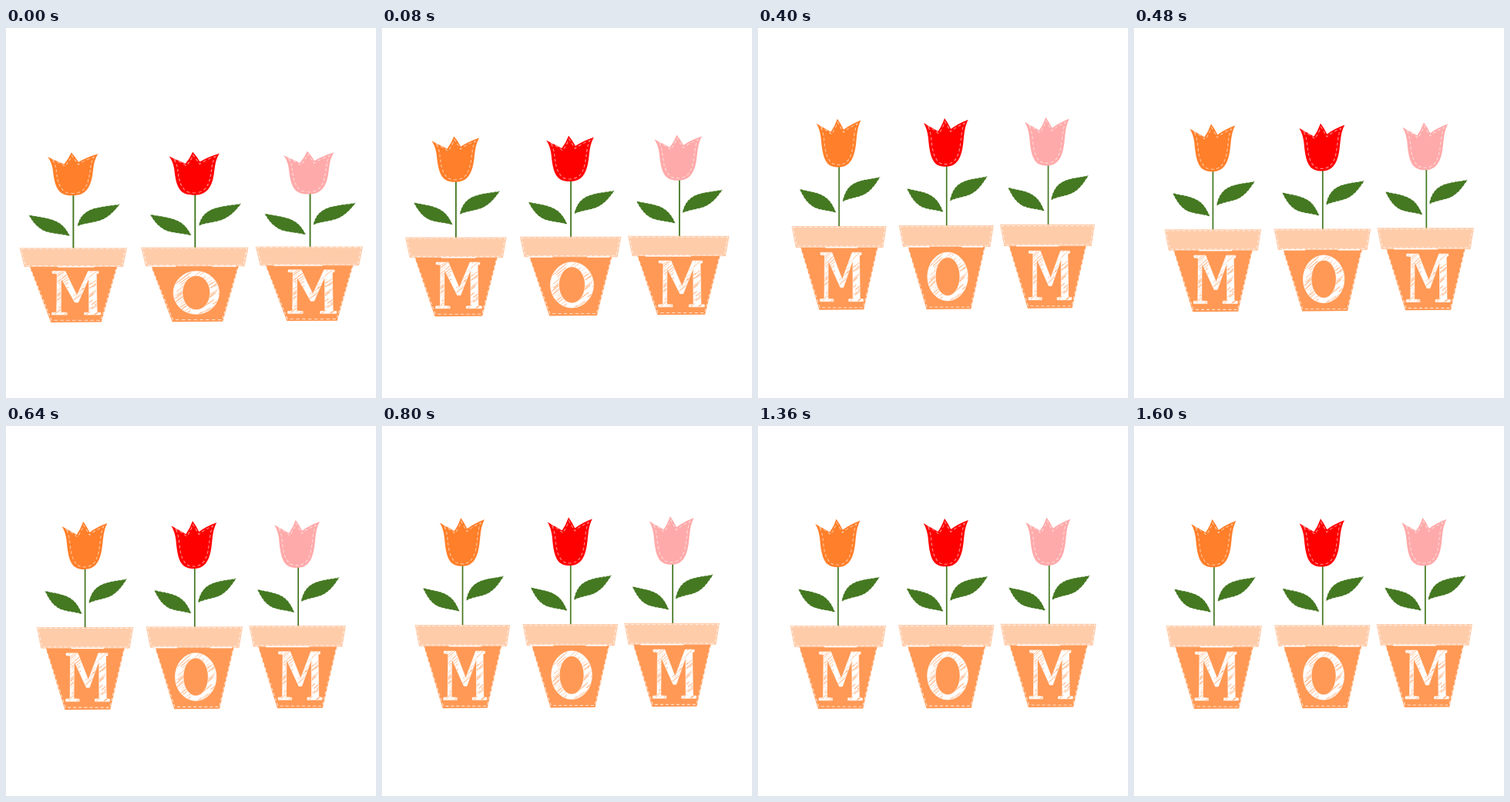
An HTML page with a canvas that plays this animation: 480x480 px, repeating every 1920 ms.

```html
<!DOCTYPE html>
<html lang="en">
<head>
<meta charset="utf-8">
<title>Mom flower pots</title>
<style>
  html, body { margin: 0; width: 100%; height: 100%; overflow: hidden; background: #fff; }
  canvas { display: block; }
</style>
</head>
<body>
<canvas id="stage" width="480" height="480"></canvas>
<script>
const ctx = document.getElementById('stage').getContext('2d');
const LOOP = 1920, STEP = 80;
// Steps at which the pose changes; in between it is held.
const POSES = [0, 1, 2, 3, 4, 5, 6, 7, 8, 9, 10, 12, 13, 14, 15, 17, 20];
const RIM = '#ffccaa', POT = '#ff9955', GREEN = '#447821';

const rim = new Path2D('M41.6 259H166L161.5 286.8H47Z');
const rimSeam = new Path2D('M43.4 260.6H164L160 285H48.4Z');
const pot = new Path2D('M53 285.5H154.8L136.2 366.5L78 367Z');
const potSeam = new Path2D('M53.5 287L78.6 364H135.8L154 287');
const tulip = new Path2D('M74.2 127.2Q83 132 93 138Q98 131 101.5 121Q106 127 109.8 135' +
  'Q119 128 132.4 123C127.5 133 127.5 141 126.5 148C125 166 121 181 107 183' +
  'C99 184 92 182.5 88 177.5C82 170 81 155 80 145C79 138 77.5 133 74.2 127.2Z');
const tulipSeam = new Path2D('M79 130.5Q88 136 94 141Q99 134 102 125.5Q106 132 109.5 138.5' +
  'Q117 132 127.5 127.5C123.5 137 124 143 123 149C121 166 118 178 106 180' +
  'C98 181 93 178.5 91 174C85.5 167 85 154 84 146C83 139 82 135 79 130.5Z');
const leaves = new Path2D('M52 211.3C60 213.5 70 214.5 79 218C89 222 95 229 100 242' +
  'C91 239 80 239 71 235C62 230 57 222 52 211.3Z' +
  'M108.3 227.8C111 214 117 206 128 202C138 198.5 148 198 157.8 195.8' +
  'C152 205 146 214 136 219C127 223 118 223 108.3 227.8Z');

const letters = {
  M: new Path2D('M79.5 293H94.5L108 328L121 293H133V296L130.5 296.5L131.3 352.5L135.5 353V356H116.5' +
    'V353L122 352.5L121.8 303L109.5 338H105.5L89.7 303L89.4 352.5L96.5 353V356H79V353L84.5 352.5L85 296.5L79.5 296Z'),
  O: new Path2D()
};
letters.O.ellipse(105.6, 324.8, 26.5, 31.2, 0, 0, 7);
letters.O.closePath();
letters.O.moveTo(121.6, 324.8);
letters.O.ellipse(105.6, 324.8, 16, 24.8, 0, 0, 7);
letters.O.closePath();

const plants = [
  { x: 0, y: 0, stem: 103, color: '#ff7f2a', letter: 'M', gaps: [[86, 128]] },
  { x: 140.5, y: -0.8, stem: 103.4, color: '#ff0000', letter: 'O', gaps: [[52, 82], [124, 152]] },
  { x: 273, y: -2, stem: 104, color: '#ffaaaa', letter: 'M', gaps: [[63, 119]] }
];

function random(seed) {
  return () => (seed = (seed * 16807) % 2147483647) / 2147483647;
}

function fill(path, color) {
  ctx.fillStyle = color;
  ctx.fill(path, 'evenodd');
}

function stitch(path, dash, width, alpha) {
  ctx.setLineDash(dash);
  ctx.lineWidth = width;
  ctx.strokeStyle = `rgba(255,255,255,${alpha})`;
  ctx.stroke(path);
  ctx.setLineDash([]);
}

function drawLetter(path) {
  const rnd = random(77);
  fill(path, '#fff');
  ctx.save();
  ctx.clip(path, 'evenodd');
  ctx.strokeStyle = POT;
  ctx.globalAlpha = 0.75;
  for (let y = 300; y < 420; y += 2.9) {
    const start = 76 + rnd() * 12, slope = 0.75 + rnd() * 0.2;
    for (let x = start; x < 136; x += 18 + rnd() * 8) {
      const end = x + 9 + rnd() * 9;
      ctx.lineWidth = 0.4 + rnd() * 0.8;
      ctx.beginPath();
      ctx.moveTo(x, y - (x - 76) * slope);
      ctx.lineTo(end, y - (end - 76) * slope);
      ctx.stroke();
    }
  }
  ctx.restore();
  ctx.lineWidth = 0.6;
  ctx.strokeStyle = '#fff';
  ctx.stroke(path);
}

function drawPlant({ x, y, stem, color, letter, gaps }) {
  ctx.save();
  ctx.translate(x, y);
  ctx.fillStyle = GREEN;
  ctx.fillRect(stem, 181, 1.7, 79);
  fill(leaves, GREEN);
  stitch(leaves, [2.5, 2.5], 1, 0.65);
  fill(tulip, color);
  stitch(tulipSeam, [4, 3], 1.1, 0.55);
  fill(pot, POT);
  stitch(potSeam, [4, 3], 1.1, 0.7);
  fill(rim, RIM);
  stitch(rimSeam, [4, 3], 1, 0.7);
  ctx.fillStyle = '#fff';
  for (const [from, to] of gaps) ctx.fillRect(from, 285.8, to - from, 1.5);
  drawLetter(letters[letter]);
  ctx.restore();
}

function draw(now) {
  const step = Math.floor((now % LOOP) / STEP);
  const t = POSES.findLast(p => p <= step) * STEP / LOOP;
  // Elastic ease-out: 1 is fully squashed, 0 is at rest.
  const squash = 2 ** (-10 * t) * Math.cos(2 * Math.PI * t / 0.3);
  const sx = 1 + 0.121 * squash, sy = 1 - 0.1044 * squash;

  ctx.setTransform(1, 0, 0, 1, 0, 0);
  ctx.fillStyle = '#fff';
  ctx.fillRect(0, 0, 480, 480);
  ctx.setTransform(sx, 0, 0, sy, 240 * (1 - sx), 366 * (1 - sy) + 15 * squash);
  plants.forEach(drawPlant);
}

const begin = performance.now();
function tick() {
  draw(performance.now() - begin);
  requestAnimationFrame(tick);
}
tick();
</script>
</body>
</html>
```
